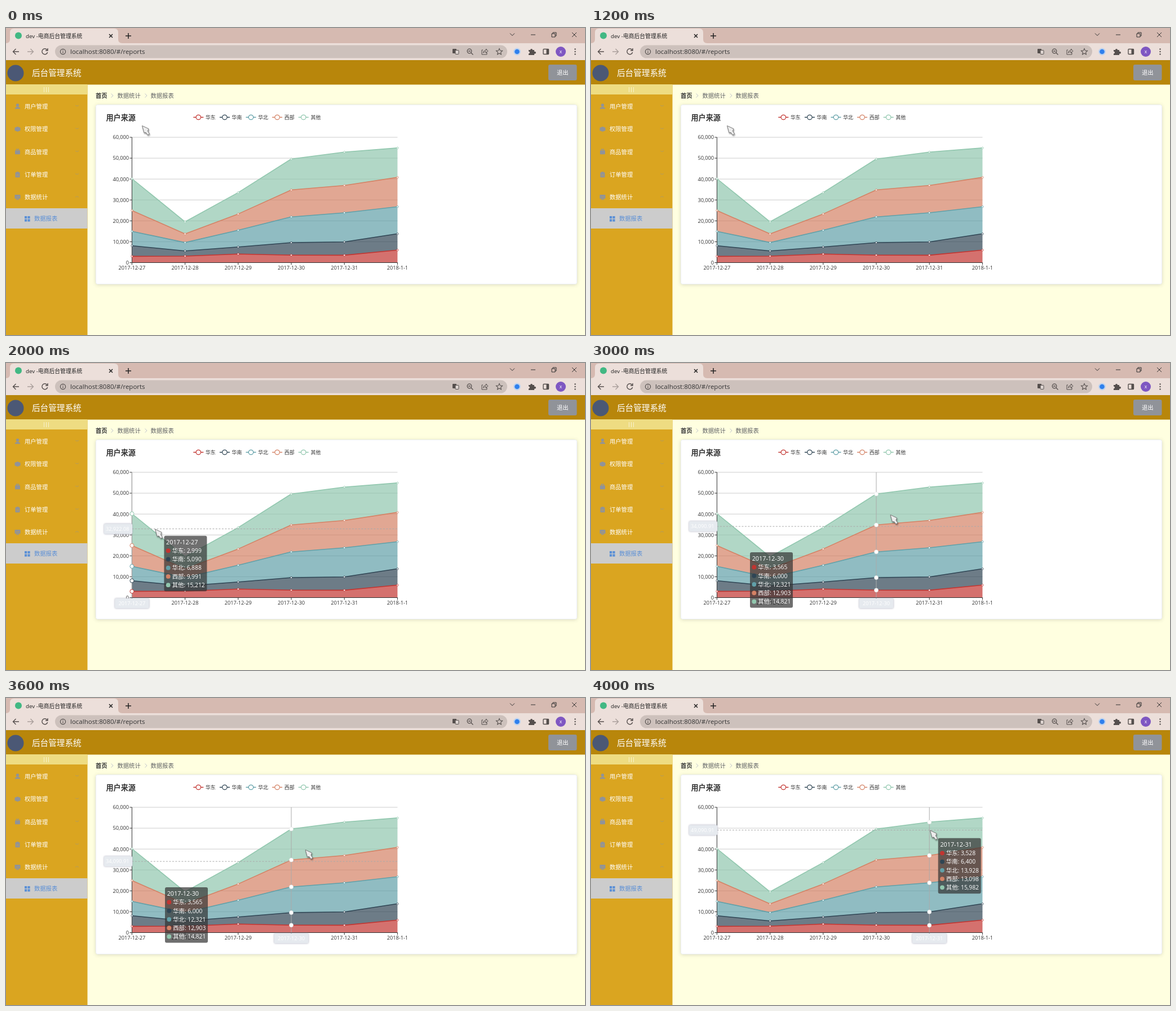
These frames come from a looping animation (1027x545 px, 5 s). An HTML page:

```html
<!DOCTYPE html>
<html lang="zh">
<head>
<meta charset="utf-8">
<title>数据报表</title>
<style>
html, body { margin: 0; width: 100%; height: 100%; overflow: hidden; background: #ffffe0; }
svg { display: block; width: 1027px; height: 545px; }
text { font-family: "Open Sans", "Noto Sans CJK SC", "Noto Sans CJK", sans-serif; white-space: pre; }
.card { filter: drop-shadow(0 1px 3px rgba(0,0,0,.14)); }
.label { filter: drop-shadow(0 0 1.5px #aab); }
.cursor { filter: drop-shadow(1px 2px 1px rgba(0,0,0,.4)); }
</style>
</head>
<body>
<svg id="stage" viewBox="0 0 1027 545"></svg>
<script>
const colors = ['#c23531', '#2f4554', '#61a0a8', '#d48265', '#91c7ae'];
const names = ['华东', '华南', '华北', '西部', '其他'];
const dates = ['2017-12-27', '2017-12-28', '2017-12-29', '2017-12-30', '2017-12-31', '2018-1-1'];
const data = [
  [2999, 3111, 4100, 3565, 3528, 6000],
  [5090, 2500, 3400, 6000, 6400, 7800],
  [6888, 4000, 8010, 12321, 13928, 12984],
  [9991, 4130, 7777, 12903, 13098, 14028],
  [15212, 5800, 10241, 14821, 15982, 14091]
];
const plotLeft = 223.4, plotRight = 694.4, plotTop = 194, plotBase = 416.5;
const px = i => plotLeft + i * (plotRight - plotLeft) / 5;
const py = v => plotBase - v * (plotBase - plotTop) / 60000;
const stack = (s, i) => data.slice(0, s + 1).reduce((sum, row) => sum + row[i], 0);
const comma = (v, digits = 0) =>
  v.toLocaleString('en-US', { minimumFractionDigits: digits, maximumFractionDigits: digits });

// y is the vertical centre of the text
const text = (x, y, size, str, fill = '#333', attrs = '') =>
  `<text x="${x}" y="${y}" dy=".37em" font-size="${size}" fill="${fill}" ${attrs}>${str}</text>`;
const rect = (x, y, w, h, fill, r = 0, attrs = '') =>
  `<rect x="${x}" y="${y}" width="${w}" height="${h}" rx="${r}" fill="${fill}" ${attrs}/>`;
const circle = (x, y, r, fill, stroke = 'none', width = 1) =>
  `<circle cx="${x}" cy="${y}" r="${r}" fill="${fill}" stroke="${stroke}" stroke-width="${width}"/>`;
const path = (d, stroke, width = 1, fill = 'none', attrs = '') =>
  `<path d="${d}" stroke="${stroke}" stroke-width="${width}" fill="${fill}" ${attrs}/>`;
const at = (x, y, content) => `<g transform="translate(${x} ${y})">${content}</g>`;
const middle = 'text-anchor="middle"', end = 'text-anchor="end"';

function browser() {
  const ink = '#554f4d', dark = '#333';
  return rect(0, 0, 1027, 28, '#d6bab1') + rect(0, 27, 1027, 30, '#ecdfda') +
    path('M0 27Q7 27 7 20V8Q7 1 14 1H192Q199 1 199 8V20Q199 27 206 27Z', 'none', 0, '#ecdfda') +
    circle(22, 13.5, 6, '#41b883') +
    text(35, 14, 9.8, 'dev -电商后台管理系统', '#222') +
    path('M183 11l6 6m0-6l-6 6M212 14h10m-5-5v10', '#222', 1.5) +
    path('M894 9.5l4 4 4-4M931 12h8M1004 8l8 8m0-8l-8 8M968 10h6v6h-6zM970 10v-2h6v6h-2', dark) +
    path('M23 42H13m4.5-5l-5 5 5 5', ink, 1.4) +
    path('M38 42h10m-4.5-5l5 5-5 5', '#aaa09c', 1.4) +
    path('M73 39a5 5 0 1 0 .7 4M74 36v4h-4', ink, 1.4) +
    rect(87, 30.5, 802, 23, '#cdc1bc', 11.5) +
    circle(101, 42, 4.6, 'none', ink, 1.2) + path('M101 41.5v3M101 39v1.2', ink, 1.2) +
    text(114, 42, 11.5, 'localhost:8080/#/reports') +
    rect(792, 37, 7, 8, ink, 1) + rect(797, 39.5, 6, 7, '#ded5d1', 1, `stroke="${ink}"`) +
    circle(822, 41, 3.8, 'none', ink, 1.3) + path('M825 44l3.5 3.5M820 41h4', ink, 1.3) +
    path('M846 39h-2v8h9v-3M846.5 44q.5-4.5 5-4.5v-2.5l3.5 4-3.5 3.5v-2.5q-3 0-5 2z', ink) +
    path('M875 36.5l1.6 3.6 3.9.4-2.9 2.6.8 3.9-3.4-2-3.4 2 .8-3.9-2.9-2.6 3.9-.4z', ink, 1.1) +
    circle(906.5, 42, 6.5, '#bcd2ef') + circle(906.5, 42, 4.3, '#2f80ed') +
    path('M927 39h3a2 2 0 1 1 4 0h3v3a2 2 0 1 1 0 3.5v2.5h-10v-2.5a2 2 0 1 0 0-4z', 'none', 0, ink) +
    rect(953, 37.5, 9.5, 9, 'none', 1, `stroke="${ink}" stroke-width="1.4"`) + rect(958.5, 37, 4, 10, ink) +
    circle(984, 42, 9, '#7e57c2') + text(984, 42, 8.5, 'x', '#fff', middle) +
    [37.5, 42, 46.5].map(y => circle(1009.5, y, 1.2, ink)).join('');
}

function sidebar() {
  const gray = '#909399', blue = '#5a8fd6';
  const icons = [
    circle(0, -2, 2.7, gray) + path('M-5 4.5Q-4 1 0 1T5 4.5Z', 'none', 0, gray),
    path('M0-4.5L5-2.5V2.5L0 4.5-5 2.5V-2.5Z', 'none', 0, gray),
    rect(-4.5, -2.5, 9, 7, gray, 1) + path('M-2-2V-4.5H2V-2', gray, 1.2),
    rect(-4, -4, 8, 9, gray, 1) + rect(-2, -5, 4, 2, gray) + path('M-2 0H2M-2 2H2', '#c6a24a', .7),
    rect(-5, -4.5, 10, 7, gray, 1) + rect(-2.5, 3, 5, 1.5, gray) + path('M-3 0l2-1 2 1 2-2', '#c6a24a', .8)
  ];
  const items = ['用户管理', '权限管理', '商品管理', '订单管理', '数据统计'].map((label, i) => {
    const y = 139 + i * 40.4, d = i < 4 ? 1.5 : -1.5;
    return at(20.5, y, icons[i]) + text(33, y, 10.3, label, '#fff') +
      path(`M123 ${y - 1 - d / 2}l3 ${d} 3 ${-d}`, '#b09a63', .9);
  });
  const squares = [0, 1, 2, 3].map(i => rect(33 + i % 2 * 5.4, 334 + (i >> 1) * 5.4, 4.2, 4.2, blue));
  return rect(0, 100, 144.5, 445, '#daa520') + rect(0, 100, 144.5, 18, '#eedc82') +
    text(71, 109, 9, '|||', '#fff', middle + ' letter-spacing="-1.2"') +
    rect(0, 320, 144.5, 36, '#ccc') + items.join('') + squares.join('') +
    text(50, 338.5, 10.3, '数据报表', blue);
}

function page() {
  return rect(0, 57, 1027, 43.5, '#b8860b') + circle(17, 80, 14.5, '#4b5875') +
    text(46, 79.5, 14.6, '后台管理系统', '#fff') +
    rect(962, 65, 50.5, 28, '#909399', 3) + text(987.2, 79, 10.3, '退出', '#fff', middle) +
    sidebar() +
    text(159, 120, 10.3, '首页', '#303133', 'font-weight="700"') +
    text(197.5, 120, 10.3, '数据统计', '#606266') + text(256.5, 120, 10.3, '数据报表', '#606266') +
    path('M186.5 116.5l3.5 3.5-3.5 3.5M246.5 116.5l3.5 3.5-3.5 3.5', '#c0c4cc') +
    rect(159.5, 136.5, 853, 318, '#fff', 3, 'class="card" stroke="#ebeef5"');
}

function chart() {
  let out = text(177.5, 159.5, 13.1, '用户来源', '#333', 'font-weight="700"');
  names.forEach((label, i) => {
    const x = 341.3 + i * 46.6;
    out += path(`M${x - 9} 158.5h18`, colors[i], 1.5) + circle(x, 158.5, 4.2, '#fff', colors[i], 1.2) +
      text(x + 12.7, 158.5, 8.9, label);
  });
  for (let v = 0; v <= 60000; v += 10000) {
    out += path(`M${plotLeft} ${py(v)}H${plotRight}`, '#ccc') + path(`M${plotLeft - 4} ${py(v)}h4`, '#333') +
      text(218, py(v), 9.2, comma(v), '#333', end);
  }
  const lines = data.map((_, s) => dates.map((_, i) => `${px(i)} ${py(stack(s, i))}`));
  const ground = [`${plotLeft} ${plotBase}`, `${plotRight} ${plotBase}`];
  lines.forEach((line, s) => {
    const below = s ? lines[s - 1] : ground;
    out += path(`M${[...line, ...[...below].reverse()].join('L')}Z`, 'none', 0, colors[s], 'opacity=".7"');
  });
  out += path(`M${plotLeft} ${plotTop}V${plotBase}H${plotRight}`, '#333');
  lines.forEach((line, s) => {
    out += path('M' + line.join('L'), colors[s], 1.6, 'none', 'stroke-linejoin="bevel"');
  });
  dates.forEach((date, i) => {
    out += path(`M${px(i)} ${plotBase}v4`, '#333') + text(px(i), 426, 9.2, date, '#333', middle);
    data.forEach((_, s) => out += circle(px(i), py(stack(s, i)), 1.6, '#fff', colors[s], .8));
  });
  return out;
}

function hover({ day, value, tip }) {
  const x = px(day), y = py(value), label = 'class="label"';
  let out = path(`M${x} ${plotTop}V${plotBase}`, '#aaa') +
    path(`M${plotLeft} ${y}H${plotRight}`, '#aaa', 1, 'none', 'stroke-dasharray="3 2.5"');
  data.forEach((_, s) => {
    out += circle(x, py(stack(s, day)), 3.5, '#fff', day ? '#e4e4e4' : colors[s], day ? .6 : 1);
  });
  out += rect(174, y - 9, 50, 18, '#e6eaef', 2, label) + text(218.5, y, 9.2, comma(value, 2), '#fff', end) +
    rect(x - 30.3, 418, 60.6, 17.5, '#e6eaef', 2, label) + text(x, 426.3, 9.2, dates[day], '#fff', middle);
  const rows = names.map((region, s) => circle(7.3, 26.5 + s * 15.25, 3.9, colors[s]) +
    text(14.3, 26.5 + s * 15.25, 10.3, `${region}: ${comma(data[s][day])}`, '#fff'));
  return out + at(...tip, rect(0, 0, 76, 98.5, 'rgba(50,50,50,.7)', 3) +
    text(3.7, 11.3, 10.8, dates[day], '#fff') + rows.join(''));
}

const cursor = path('M0 0L11.5 5.5 10 9.5 13 14.5 10 16.5 6.5 12 3.5 12.5Z',
  '#777', 1, '#ececec', 'class="cursor" stroke-linejoin="round"');
const states = [
  { pointer: [241.5, 173.5] },
  { pointer: [264.5, 295], day: 0, value: 32922.08, tip: [280.4, 306.7] },
  { pointer: [531, 269.5], day: 3, value: 34090.91, tip: [282, 336] },
  { pointer: [601.5, 235], day: 4, value: 49090.91, tip: [615.7, 248.8] }
];

const stage = document.getElementById('stage');
stage.innerHTML = browser() + page() + chart() + states.map(state =>
  `<g class="state">${state.tip ? hover(state) : ''}${at(...state.pointer, cursor)}</g>`).join('');
const groups = [...stage.querySelectorAll('.state')];

function draw() {
  const t = performance.now() % 5000;
  const current = Math.max(0, Math.floor(t / 1000) - 1);
  groups.forEach((group, i) => group.style.display = i === current ? '' : 'none');
  requestAnimationFrame(draw);
}
draw();
</script>
</body>
</html>
```
